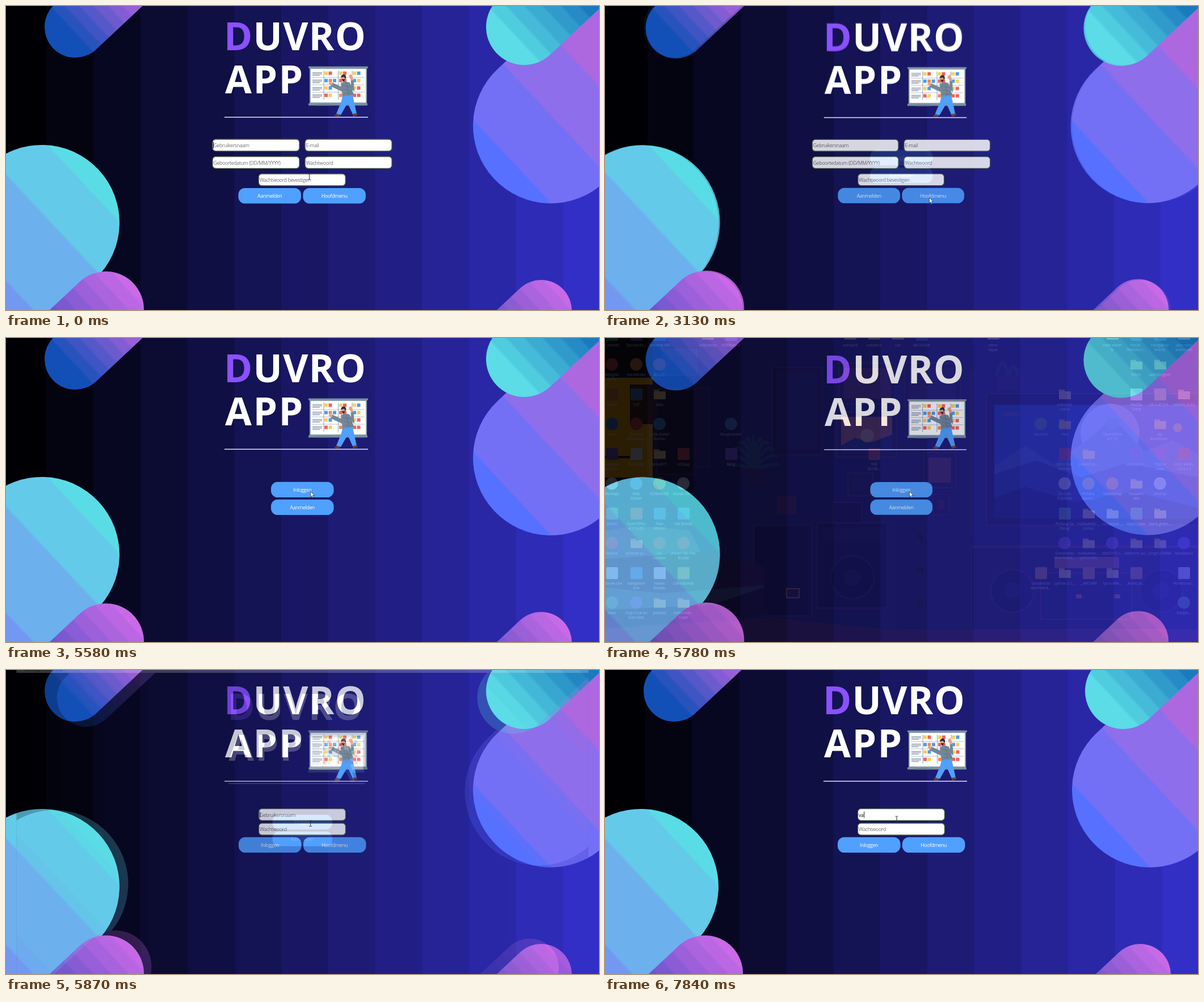
These frames come from a looping animation (1045 by 536 pixels, 8000 ms). An HTML page:

```html
<!DOCTYPE html>
<html lang="nl">
<head>
<meta charset="utf-8">
<title>Duvro App</title>
<style>
html, body { margin: 0; width: 100%; height: 100%; overflow: hidden; background: #000; }
svg { display: block; width: 100vw; height: 100vh; }
text { font-family: "Open Sans", "Noto Sans", sans-serif; }
.ui { font-size: 8.8px; letter-spacing: -.045em; }
.title { font-size: 68px; font-weight: 700; letter-spacing: 1.2px; fill: #fff; }
.label { font-size: 6.6px; letter-spacing: -.03em; fill: #fff; text-anchor: middle; }
</style>
</head>
<body>
<svg id="stage" viewBox="0 0 1045 536" preserveAspectRatio="none"></svg>
<script>
const LOOP = 8000;
const UX = .73, UY = -.683;
const BLUE = '#4fa0ff';
const $ = id => document.getElementById(id);
const mix = (a, b, k) => `rgb(${a.map((v, i) => Math.round(v + (b[i] - v) * k))})`;
const rect = (x, y, w, h, fill, more = '') =>
  `<rect x="${x}" y="${y}" width="${w}" height="${h}" fill="${fill}" ${more}/>`;
const path = (d, fill, more = '') => `<path d="${d}" fill="${fill}" ${more}/>`;
const text = (x, y, s, cls, more = '') => `<text x="${x}" y="${y}" class="${cls}" ${more}>${s}</text>`;

// Capsule along the diagonal; each stop is [distance from its centre, colour from there on].
function capsule(id, x, y, r, dir, stops) {
  const at = d => (d + 250) / 500;
  const marks = stops.map(([d, c], i) =>
    (i ? `<stop offset="${at(d - 2)}" stop-color="${stops[i - 1][1]}"/>` : '') +
    `<stop offset="${at(d + 2)}" stop-color="${c}"/>`).join('');
  return `<linearGradient id="${id}" gradientUnits="userSpaceOnUse" x1="${x - 250 * UX}" y1="${y - 250 * UY}"
    x2="${x + 250 * UX}" y2="${y + 250 * UY}">${marks}</linearGradient>
    <line x1="${x}" y1="${y}" x2="${x + dir * 400 * UX}" y2="${y + dir * 400 * UY}"
    stroke="url(#${id})" stroke-width="${2 * r}" stroke-linecap="round"/>`;
}

function bands(c0, c1, d0, d1, n) {
  return Array.from({ length: n }, (_, i) => [d0 + (d1 - d0) * i / n, mix(c0, c1, i / (n - 1))]);
}

function backdrop() {
  let s = '';
  for (let i = 0; i < 13; i++) {
    const x = i ? 71 + 82.8 * (i - 1) : -10;
    const k = Math.max(.008, (i - .1) / 12.2);
    s += rect(x, -12, i ? 85 : 82, 640, mix([0, 0, 2], [51, 48, 204], k));
  }
  return s +
    capsule('tl', 122, 37, 54, 1, bands([18, 80, 184], [152, 96, 216], -25, 105, 7)) +
    capsule('rb', 960, 211, 137, 1, [[-240, '#5670ff'], [-93, '#7370f5'], [13, '#8f6eeb'], [110, '#ad68e0']]) +
    capsule('tr', 913, 37, 67, 1, bands([91, 220, 230], [26, 122, 190], -45, 120, 7)) +
    capsule('lb', 63, 382, 137, -1, [[-240, '#7398f1'], [-116, '#6cb0ee'], [12, '#64cae9'], [101, '#5adce6']]) +
    capsule('bl', 176, 535, 67, -1, bands([106, 86, 205], [203, 106, 231], -85, 75, 7)) +
    capsule('br', 943, 537, 54, -1, bands([125, 90, 205], [200, 106, 231], -62, 60, 6));
}

function board() {
  const notes = ['#f9cf5b', '#f0625d', '#4c9cf0', '#f58b4c', '#f9cf5b', '#4c9cf0', '#f0625d'];
  let s = rect(535, 109, 101, 63, '#8fa5b3') + rect(537, 111, 97, 59, '#fff') +
    rect(533, 106.5, 105, 3.2, '#7890a0', 'rx="1"') + rect(533, 171.5, 104, 4, '#7890a0', 'rx="1"') +
    rect(548, 174, 24, 2, '#5f7686');
  for (let r = 0; r < 4; r++) {
    const y = 115 + r * 13;
    for (let k = 0; k < 3; k++) s += rect(540, y + 2 + k * 2.4, k == 2 ? 13 : 17, 1.1, '#7f8b9c');
    [561, 568.5, 576, 587, 594, 611, 618.5].forEach((x, c) => {
      if (c != 2 || r == 1) s += rect(x, y + .5, 6, 6, notes[(r * 2 + c + (c >> 1)) % 7]);
    });
    if (r) s += rect(539, y - 2.4, 93, .8, '#a3aebb');
  }
  s += [559.5, 585, 609.5].map(x => rect(x, 114, .9, 51, '#8f9bab')).join('');
  const skin = '#e9a07c';
  return s +
    path('M594 154 L610 154 L613 167 L618 190 L611 191 L602 171 L590 192 L582 190 L591 168Z', BLUE) +
    path('M582 190 L589 192 L587 195 L578 194Z M612 190 L618 189 L620 192 L611 195Z', '#6b4038') +
    path('M573 138 L592 147 L599 139', 'none', 'stroke="#738899" stroke-width="7" stroke-linejoin="round"') +
    path('M590 136 Q598 132 606 135 L613 157 L593 159Z', '#738899') +
    path('M602 137 L611 145 L610 131', 'none', 'stroke="#738899" stroke-width="5"') +
    path('M593 140 L608 143 M595 147 L610 150 M596 154 L612 154 M600 135 L604 157', 'none',
      'stroke="#5b6f80" stroke-width=".8"') +
    path('M574 140 L568 137 L571 134 L576 137Z M608 131 L604 123 L608 120 L613 131Z', skin) +
    `<circle cx="594.5" cy="128" r="4.4" fill="${skin}"/>` +
    path('M590 126 Q591 120 597 121 Q601 124 598 129 L596 125Z M591 129 L598 129 L595 134Z', '#332b3a');
}

const header = () =>
  text(384, 78, '<tspan fill="#8b50ff">D</tspan>UVRO', 'title') +
  text(386, 154, 'APP', 'title', 'style="letter-spacing:2.5px"') +
  board() + rect(385, 195.4, 253, 1.5, '#e4e4ee');

const button = (x, y, s) => rect(x, y, 110.5, 27.3, BLUE, 'rx="11.5"') +
  text(x + 55.2, y + 17, s, 'ui', 'fill="#fff" text-anchor="middle"');

const fieldsOf = {
  reg: [[364, 235, 'Gebruikersnaam'], [527, 235, 'E-mail'], [364, 265.5, 'Geboortedatum (DD/MM/YYYY)'],
    [527, 265.5, 'Wachtwoord'], [445.2, 296, 'Wachtwoord bevestigen']],
  home: [],
  login: [[445.5, 244.6, 'Gebruikersnaam'], [445.5, 270.2, 'Wachtwoord']]
};
const buttonsOf = {
  reg: [[409.5, 321, 'Aanmelden'], [523.4, 321, 'Hoofdmenu']],
  home: [[467, 253.8, 'Inloggen'], [467, 284.8, 'Aanmelden']],
  login: [[410, 294.7, 'Inloggen'], [524, 294.7, 'Hoofdmenu']]
};

function page(id) {
  const inputs = fieldsOf[id].map(([x, y, s], i) =>
    rect(x, y, 153, 20.8, '#fff', 'rx="5.5" stroke="#4d5f45" stroke-width="1.3"') +
    text(x + 1.5, y + 14, s, 'ui', `id="${id}${i}" fill="#757575"`)).join('');
  return `<g id="${id}"><g clip-path="url(#frame)"><use href="#base"/></g>` +
    rect(-7, -32, 1059, 23, '#ececf0') + text(8, -12, 'DuvroApp - Hoofdmenu', 'label', 'style="fill:#333;text-anchor:start"') +
    inputs + buttonsOf[id].map(b => button(...b)).join('') + rect(0, 0, 1, 11, '#222', `id="${id}Caret"`) + '</g>';
}

// Desktop icons by column, top to bottom; "/" breaks a label.
const columns = {
  12: 'Corbeille,Webgids/Nova,Firefox,Local,Indexeur/Edition,Montage,Stoom,Bavard,Kasboek Live,Meer',
  55: 'Spooklicht…,HandBrake,TOP,Diplome/Informatiq…,WOLFHOL,Web/Zoeker,OpenOffice/4.1.14 (fr),premier-pr…,Navigateur/Aria,Hulp Druk en/Scan Gids',
  96: 'Terminal 44K,B.O.L.T.,skills,Code Atelier/Bureau,marin4071…,KORVANDE,Plan/Mistral,De/Lokalen,Haven/Bureau,pension',
  138: ',,,,LICEcap,Boreal Client,Het Bosdal,Zonen Van Het/Bosdal,Client Boreal,sollicitaties -/Copie',
  181: 'sollicitaties',
  222: 'ROMDepot,,,BoogInstaller,Boog',
  432: 'volmacht',
  474: 'nokatech,,,,THE/GLOW…',
  516: 'usb',
  558: 'BELVONIA',
  684: 'citron/tapas',
  768: ',,,Nachtuil,,,,,Donderbox/Mod Mana…',
  810: ',,online les/videos,foto,Kern Toer/Meester,De Grot/Expeditie,Proloog Ga/Terug!,Donderbox/Mod Mana…,python-3.1…',
  852: ',,,,pakket132-…,Fichiers/source…,motivatiebr…/cursus,motivatiebr…/pythondev,__ARCHIEF',
  894: 'code atelier/tr,,,OpenOffice/4.1.15,,TekenSetup,romdepot-…,65d701f2-c…,cpu-softw…',
  936: 'Nieuw -/Tekstdocu…,fichier,FileZilla/Client,,ModUp-9.1…,fotowerk/test,Kaart Lezer,veldtocht_lau…,AriaXLSe…',
  978: 'Navigateur/Aria XL,webdesigner,Git-2.47.0-6…,op/documant…,Pagina/Lezer,ModUp,black-green…,projet LOMBA',
  1020: 'sites voor/solicitaties,,softlien_2.4.0,,Code Adder/2024.2.3,,,Muntbeurs,Fichiers+so…,Kladjes…'
};

function icons() {
  const hues = ['#3f87d8', '#d84a4a', '#e8e8f0', '#58a878', '#7a5ad0', '#e08a3a'];
  let s = '';
  for (const x in columns) columns[x].split(',').forEach((name, i) => {
    if (!name) return;
    const y = 46.5 + 52.5 * (i - 1), c = hues[(name.length * 3 + i + +x) % 6];
    if (/^[a-z]/.test(name)) s += rect(+x - 10, y - 8, 10, 5, '#e0ae45') + rect(+x - 10, y - 5, 21, 14, '#f6d67a', 'rx="1"');
    else s += i % 2 ? `<circle cx="${x}" cy="${y}" r="11" fill="${c}"/>` : rect(+x - 10, y - 10, 21, 21, c, 'rx="2"');
    name.split('/').forEach((line, k) => s += text(x, y + 20.5 + 8 * k, line, 'label'));
  });
  return s;
}

function desktop() {
  const edge = 'stroke="#5c2c38" stroke-width="1.5"';
  const poster = (x, y, w, h, c) => rect(x, y, w, h, '#1c1430', edge) + rect(x + 8, y + 9, w - 16, h - 18, c);
  const speaker = (x, y, r) => `<circle cx="${x}" cy="${y}" r="${r}" fill="#070818" stroke="#241f3a" stroke-width="3"/>` +
    `<circle cx="${x}" cy="${y}" r="${r * .4}" fill="#15173a"/>`;
  let leaves = '';
  for (let i = 0; i < 11; i++) {
    const a = Math.PI * (1.02 + i * .096);
    leaves += `M262 232 Q${262 + 26 * Math.cos(a)} ${226 + 70 * Math.sin(a)} ${262 + 46 * Math.cos(a)} ${226 + 46 * Math.sin(a)} `;
  }
  return rect(0, 0, 1045, 536, '#14184c') +
    // window, shelf and wall
    rect(0, 0, 84, 62, '#1a1420') + rect(0, 70, 84, 176, '#ffae08') + rect(44, 82, 40, 70, '#4a2a18') +
    rect(0, 208, 44, 4, '#3a2018') + rect(84, 0, 6, 246, '#3a2030') + rect(100, 20, 62, 46, '#1c2a66', edge) +
    rect(92, 90, 64, 150, '#1d1328', edge) + rect(160, 88, 24, 140, '#241a40', edge) +
    poster(294, 52, 88, 154, '#1f1c44') + poster(412, 44, 100, 72, '#5e2f38') + poster(408, 130, 106, 80, '#d97830') +
    path('M416 190 L440 176 L470 184 L506 170 V201 H416Z', '#1c2c6a') +
    `<circle cx="462" cy="172" r="12" fill="#ffc860"/>` + poster(528, 44, 98, 76, '#2c2348') +
    poster(562, 202, 56, 62, '#8a3a3c') + poster(428, 238, 44, 40, '#181e4a') + poster(578, 276, 28, 36, '#4a2234') +
    path(leaves, 'none', 'stroke="#1a4a44" stroke-width="6"') + rect(246, 230, 34, 30, '#2a1830') +
    path('M690 68 Q700 20 710 66 Q722 34 728 68', 'none', 'stroke="#1c3a50" stroke-width="6"') +
    rect(692, 66, 36, 26, '#24244c') + rect(642, 60, 6, 280, '#3a2040') +
    // television
    rect(672, 98, 384, 232, '#0a0a24', edge) + rect(686, 118, 359, 200, '#1450c4') +
    `<circle cx="890" cy="168" r="52" fill="#5c92f0"/><circle cx="1009" cy="158" r="8" fill="#d5a05a"/>` +
    path('M686 226 L740 190 L790 222 L850 180 L895 140 L950 200 L1000 180 L1045 205 V250 H686Z', '#3a70d0') +
    path('M686 240 L760 216 L840 246 L920 220 L1045 246 V318 H686Z', '#1a3f9c') +
    path('M686 318 V282 L740 262 L830 290 L930 270 L1045 300 V318Z', '#0c1c58') +
    text(698, 138, 'GAMER', '', 'font-size="9" fill="#e0704a"') +
    // furniture
    rect(646, 368, 399, 146, '#120e28', edge) + rect(646, 366, 399, 4, '#5a2a34') + rect(792, 386, 114, 20, '#a85a3c') +
    rect(768, 414, 160, 82, '#0d0f2c', edge) +
    speaker(718, 446, 38) + speaker(980, 446, 38) + rect(830, 452, 10, 7, '#d07040') + rect(898, 452, 10, 7, '#d07040') +
    rect(514, 318, 128, 196, '#12164a', 'stroke="#1c205c"') + speaker(555, 350, 8) + speaker(555, 410, 8) + speaker(555, 468, 8) +
    rect(374, 326, 124, 150, '#0c0c26', edge) + rect(384, 334, 104, 24, '#18163a') + speaker(436, 422, 38) +
    rect(402, 290, 50, 36, '#0b0c26', edge) + rect(304, 280, 32, 30, '#5a222c', edge) +
    rect(262, 330, 102, 160, '#100c26', edge) + rect(320, 442, 22, 16, '#2a1828', 'stroke="#e08a50" stroke-width="2"') +
    path('M0 340 Q60 326 150 340 L170 380 L280 404 V440 L190 470 L0 480Z', '#3c4a58') +
    path('M0 390 L180 376 L280 404 V436 L100 450 L0 440Z', '#2a1428') +
    path('M0 480 L190 470 L280 440 V490 L0 512Z', '#180f26') +
    path('M0 512 L300 494 L500 514 H1045 V536 H0Z', '#4c1e30') + icons();
}

$('stage').innerHTML = `<defs><clipPath id="frame">${rect(-7, -9, 1059, 600, '#000')}</clipPath>
  <g id="base">${backdrop()}${header()}</g></defs><use href="#base"/>
  <g id="desktop">${desktop()}</g>${['reg', 'home', 'login'].map(page).join('')}
  <g id="arrow">${path('M0 0 V9.6 L2.2 7.6 L3.8 11 L5.4 10.3 L3.9 7 H7Z', '#fff', 'stroke="#222" stroke-width=".7"')}</g>
  <g id="beam">${path('M-2.3 -5 H-.6 L0 -4.4 L.6 -5 H2.3 M0 -4.4 V4.4 M-2.3 5 H-.6 L0 4.4 L.6 5 H2.3', 'none', 'stroke="#333"')}</g>`;

// start, lower page, its scale and opacity, upper page, its opacity
const steps = [
  [0, 'reg', 1, 1], [3010, 'reg', .999, 1, 'home', .03], [3070, 'reg', .996, 1, 'home', .09],
  [3130, 'reg', .992, 1, 'home', .17], [3180, 'reg', .98, 1, 'home', .45], [3220, 'reg', .966, 1, 'home', .75],
  [3260, 'home', 1, 1], [5780, 'home', .992, .83], [5820, 'home', .982, .53],
  [5870, 'home', .952, 1, 'login', .77], [5910, 'login', 1, 1]
];

// start, end, target x and y of the pointer
const moves = [[340, 430, 534, 300], [1650, 1810, 539, 285], [1980, 2680, 571.5, 338],
  [3450, 4280, 551, 292], [4950, 5580, 536.6, 270.6], [6020, 6600, 514, 263]];

const caretOn = [[0, 430], [950, 1510], [2040, 2580], [5870, 6340], [6850, 7410], [7660, 8000]];

function pointer(t) {
  let x = 534.5, y = 301;
  for (const [a, b, tx, ty] of moves) {
    if (t < a) break;
    const k = 1 - Math.pow(1 - Math.min(1, (t - a) / (b - a)), 2.5);
    x += (tx - x) * k;
    y += (ty - y) * k;
  }
  return [x, y];
}

const show = (id, on) => $(id).setAttribute('display', on ? 'inline' : 'none');

function render(t) {
  const [, low, scale, alpha, high, mixIn] = steps.filter(s => s[0] <= t).pop();
  for (const id of ['reg', 'home', 'login']) {
    const g = $(id), s = id === low ? scale : 1;
    show(id, id === low || id === high);
    g.setAttribute('opacity', id === high ? mixIn : alpha);
    g.setAttribute('transform', `translate(522 283) scale(${s}) translate(-522 -283)`);
  }
  show('desktop', alpha < 1);

  const typed = 'va'.slice(0, t < 7660 ? 0 : t < 7840 ? 1 : 2);
  const name = $('login0');
  name.textContent = typed || 'Gebruikersnaam';
  name.setAttribute('fill', typed ? '#111' : '#757575');
  const blink = caretOn.some(([a, b]) => t >= a && t < b);
  show('regCaret', blink);
  show('loginCaret', blink);
  show('homeCaret', false);
  $('regCaret').setAttribute('transform', 'translate(365 240)');
  $('loginCaret').setAttribute('transform', `translate(${447 + 4.6 * typed.length} 249.6)`);

  const [x, y] = pointer(t);
  const over = fieldsOf[high && t > 5000 ? high : low].some(([fx, fy]) =>
    x > fx && x < fx + 153 && y > fy && y < fy + 21);
  show('beam', over);
  show('arrow', !over);
  $(over ? 'beam' : 'arrow').setAttribute('transform', `translate(${x} ${y})`);
}

const begin = performance.now();
function tick() {
  render((performance.now() - begin) % LOOP);
  requestAnimationFrame(tick);
}
tick();
</script>
</body>
</html>
```
